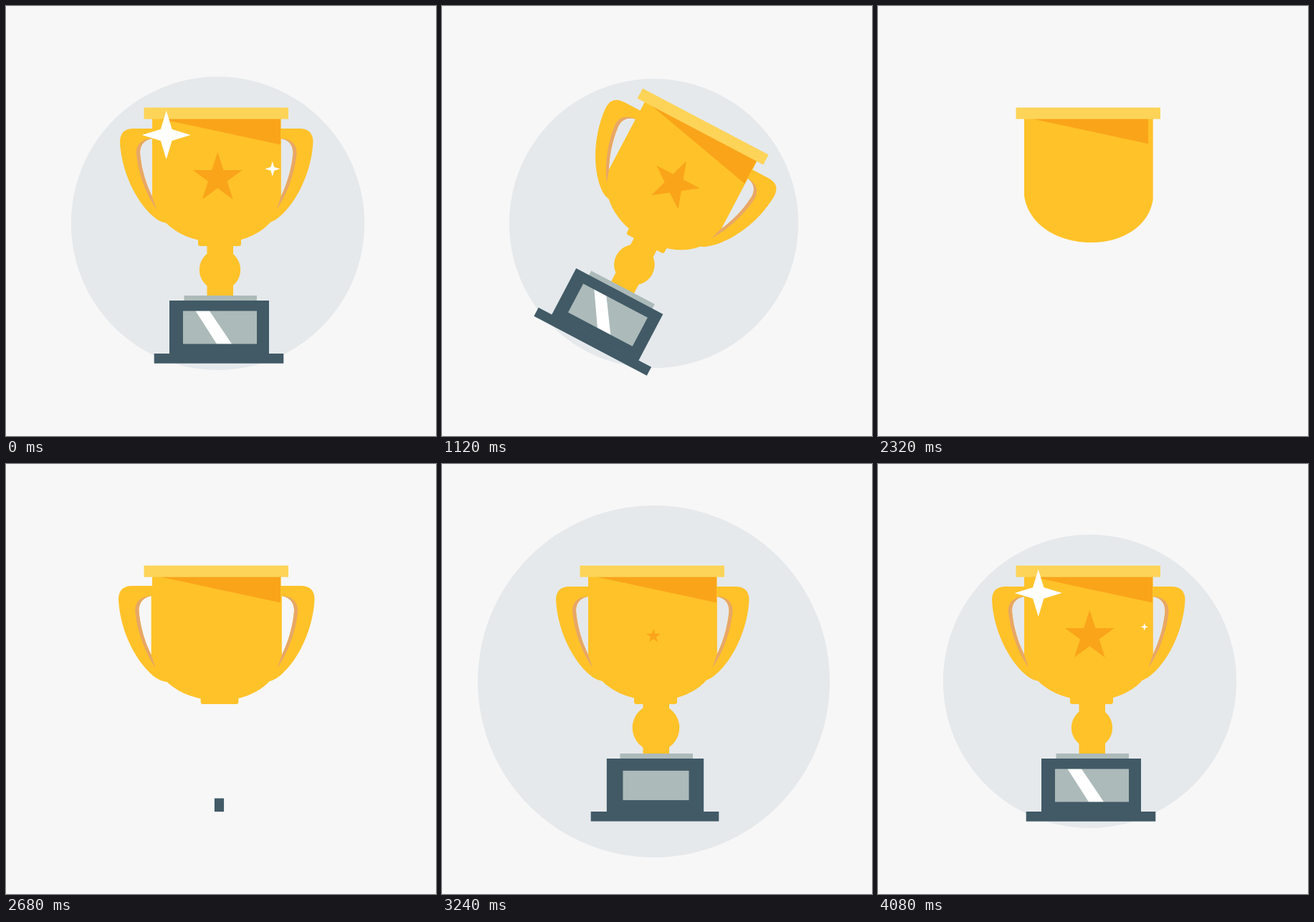
Write an HTML page that moves like this. It is 600x600 px and loops after 4120 ms.

```html
<!DOCTYPE html>
<html lang="en">
<head>
<meta charset="utf-8">
<title>Trophy</title>
<style>
html, body { margin: 0; width: 100%; height: 100%; overflow: hidden; background: #f7f7f7; }
svg { display: block; width: 100vw; height: 100vh; }
</style>
</head>
<body>
<svg viewBox="0 0 600 600">
  <defs>
    <path id="grip" fill="#ffc229" fill-rule="evenodd"
      d="M232 171H178Q159 171 159 190C161 232 183 278 211 298Q217 302 224 303L232 302Z
         M204 185C192 187 187 195 187 205C189 230 197 252 204 266Z"/>
    <path id="edge" fill="#e8a766"
      d="M204 185C190 185 181 193 182 207C185 235 196 264 210 284L204 266C197 252 189 230 187 205C187 195 192 187 204 185Z"/>
    <clipPath id="pane"><rect x="247" y="425.5" width="103" height="46"/></clipPath>
  </defs>
  <rect id="shadow" width="700"/>
  <circle id="disc" cx="295.5" cy="303.3" fill="#e5e9ec"/>
  <g id="trophy">
    <g id="handles">
      <use href="#grip"/>
      <use href="#grip" transform="translate(587.5) scale(-1 1)"/>
    </g>
    <rect id="stem" x="280.5" y="326" width="36.5" fill="#ffc229"/>
    <circle id="ball" cx="298.5" cy="368" r="28.7" fill="#ffc229"/>
    <path id="collar" d="M268 326H328V332Q328 335 325 335H271Q268 335 268 332Z" fill="#ffc229"/>
    <path id="cup" fill="#ffc229"/>
    <g id="edges">
      <use href="#edge"/>
      <use href="#edge" transform="translate(587.5) scale(-1 1)"/>
    </g>
    <path id="shade" d="M213 157H383V193.5Z" fill="#faa41a"/>
    <rect id="rim" x="192.5" y="141.7" width="201.5" height="16" fill="#fdd458"/>
    <path id="star" fill="#faa41a"/>
    <rect id="plate" x="248.5" y="404" width="101.5" height="9" fill="#adbaba"/>
    <rect id="block" x="228" y="411" width="139" height="74.5" fill="#415a66"/>
    <rect id="foot" x="206.7" y="485" width="180.6" height="13.7" fill="#415a66"/>
    <g id="glass">
      <rect x="247" y="425.5" width="103" height="46" fill="#adbaba"/>
      <g clip-path="url(#pane)"><path id="glint" d="M264.5 425.5H284L315 471.5H294Z" fill="#fff"/></g>
    </g>
  </g>
  <g id="sparks" fill="#fff"></g>
</svg>
<script>
const LOOP = 4120, STEP = 40, LEAVE = 560, GONE = 1600;
const el = {};
document.querySelectorAll('svg [id]').forEach(n => el[n.id] = n);
const set = (id, name, value) => el[id].setAttribute(name, value);

// Eased value from a flat list: time, value, time, value...
function keys(t, ...k) {
  if (t <= k[0]) return k[1];
  for (let i = 2; i < k.length; i += 2) {
    if (t <= k[i]) {
      const p = (t - k[i - 2]) / (k[i] - k[i - 2]);
      return k[i - 1] + (k[i + 1] - k[i - 1]) * (1 - Math.cos(p * Math.PI)) / 2;
    }
  }
  return k[k.length - 1];
}

function burst(points, inner, cx = 0, cy = 0, r = 1) {
  const out = [];
  for (let i = 0; i < points * 2; i++) {
    const a = i * Math.PI / points - Math.PI / 2, d = i % 2 ? r * inner : r;
    out.push((cx + d * Math.cos(a)).toFixed(3) + ' ' + (cy + d * Math.sin(a)).toFixed(3));
  }
  return 'M' + out.join('L') + 'Z';
}

function scale(id, x, y, sx, sy = sx) {
  set(id, 'transform', `translate(${x} ${y}) scale(${sx} ${sy}) translate(${-x} ${-y})`);
}

set('star', 'd', burst(5, 0.385, 295.3, 240.3, 36.3));

const sparks = [
  { x: 317.5, y: 240, r: t => keys(t, 1660, 0, 1800, 23.5, 1940, 0) },
  { x: 309, y: 358, r: t => keys(t, 3520, 0, 3560, 3.5, 3680, 12, 3840, 0) },
  { x: 223.7, y: 180, r: t => keys(t, 3780, 0, 4080, 33, 4120, 34, 4440, 0) },
  { x: 371.8, y: 227.2, r: t => keys(t, 4040, 0, 4080, 5.5, 4120, 10.5, 4240, 13, 4520, 0) }
].map(s => {
  s.node = document.createElementNS('http://www.w3.org/2000/svg', 'path');
  s.node.setAttribute('d', burst(4, 0.33));
  el.sparks.append(s.node);
  return s;
});

function discRadius(t) {
  if (t < 2780) return 0;
  if (t < 3220) return 246 * (1 - Math.pow(1 - (t - 2780) / 440, 3));
  return keys(t, 3220, 246, 3600, 189.5, 3960, 204.7);
}

function drawCup(t) {
  const grow = keys(t, 1690, 0, 2070, 1);
  const round = 1 - keys(t, 1800, 0, 2070, 1);
  const side = 270 - 27 * round, left = 265 - 22 * round;
  const rx = 90 * round, ry = 86 * round;
  set('cup', 'd', `M204 ${left}V${157 + ry}A${rx} ${ry} 0 0 1 ${204 + rx} 157H${383.7 - rx}` +
    `A${rx} ${ry} 0 0 1 383.7 ${157 + ry}V${side}C378 308 340 330 298 330C250 330 210 305 204 ${left}Z`);
  scale('cup', 293.5, 243, grow, Math.pow(grow, 0.93));
}

function build(t) {
  set('disc', 'r', discRadius(t));
  drawCup(t);

  const dx = keys(t, 1980, -29, 2140, 0);
  const dy = keys(t, 1980, -99, 2140, 0, 2220, -18, 2310, 0);
  set('rim', 'transform', `translate(${dx} ${dy})`);
  set('rim', 'opacity', keys(t, 1960, 0, 2020, 1));
  scale('shade', 213, 157, keys(t, 2120, 0, 2320, 0.965, 2380, 1));

  const grip = keys(t, 2360, 0, 2640, 1.02, 2760, 1);
  scale('handles', 293.75, 240, grip);
  scale('edges', 293.75, 240, grip);
  set('edges', 'opacity', keys(t, 2540, 0, 2640, 1));

  scale('collar', 298, 326, keys(t, 2480, 0, 2760, 1.08, 2960, 1.035, 3200, 1), keys(t, 2480, 0, 2640, 1));
  set('stem', 'height', t < 2500 ? 0 : keys(t, 2660, 4, 2960, 65, 3080, 79));
  scale('ball', 298.5, 368, keys(t, 2980, 0, 3220, 1.15, 3400, 0.98, 3540, 1));

  scale('block', 297.5, 485, keys(t, 2620, 0, 2940, 1.123, 2980, 1.12, 3300, 0.96, 3560, 0.98, 3760, 1),
    keys(t, 2620, 0, 2800, 1));
  set('plate', 'transform', `translate(0 ${keys(t, 2760, 10, 2960, -2.5, 3200, 0)})`);
  set('plate', 'opacity', t < 2780 ? 0 : 1);
  scale('foot', 297, 485, keys(t, 2980, 0, 3300, 1.08, 3560, 0.963, 3800, 1));
  scale('glass', 298.5, 448.5, keys(t, 3080, 0, 3300, 1.08, 3480, 1));
  set('glint', 'transform', `translate(${keys(t, 3240, -75, 3560, -11.5, 3800, 0)})`);
  scale('star', 295, 240, keys(t, 3160, 0, 3400, 1.14, 3560, 1.015, 3680, 1));
}

function leave(t) {
  let size = 1, turn = 0;
  if (t > LEAVE && t < 1640) {
    const p = Math.min(1, (t - LEAVE) / (GONE - LEAVE));
    turn = 178 * p ** 3;
    size = t < 980 ? 1 + 0.41 * ((t - LEAVE) / 420) ** 2
                   : 1.41 * Math.max(0, 1 - (t - 980) / (GONE - 980)) ** 1.4;
  }
  scale('disc', 295.7, 303.3, size);
  set('trophy', 'transform',
    `translate(295.7 303.3) rotate(${turn}) scale(${size}) translate(-295.7 -303.3)`);

  const r = 204.7 * size;
  set('shadow', 'height', 2 * r);
  set('shadow', 'transform', `translate(295.7 303.3) rotate(35) translate(0 ${-r})`);
  set('shadow', 'opacity', Math.min(0.008, Math.max(0, (size - 1) * 0.035)));
}

function draw(now) {
  const t = Math.floor((now % LOOP) / STEP) * STEP;
  build(t < 1640 ? t + LOOP : t);
  leave(t);
  const when = t < LEAVE ? t + LOOP : t;
  for (const s of sparks) {
    s.node.setAttribute('transform', `translate(${s.x} ${s.y}) scale(${s.r(when)})`);
  }
}

let start;
function tick(now) {
  start ??= now;
  draw(Math.max(0, now - start));
  requestAnimationFrame(tick);
}
draw(0);
requestAnimationFrame(tick);
</script>
</body>
</html>
```
